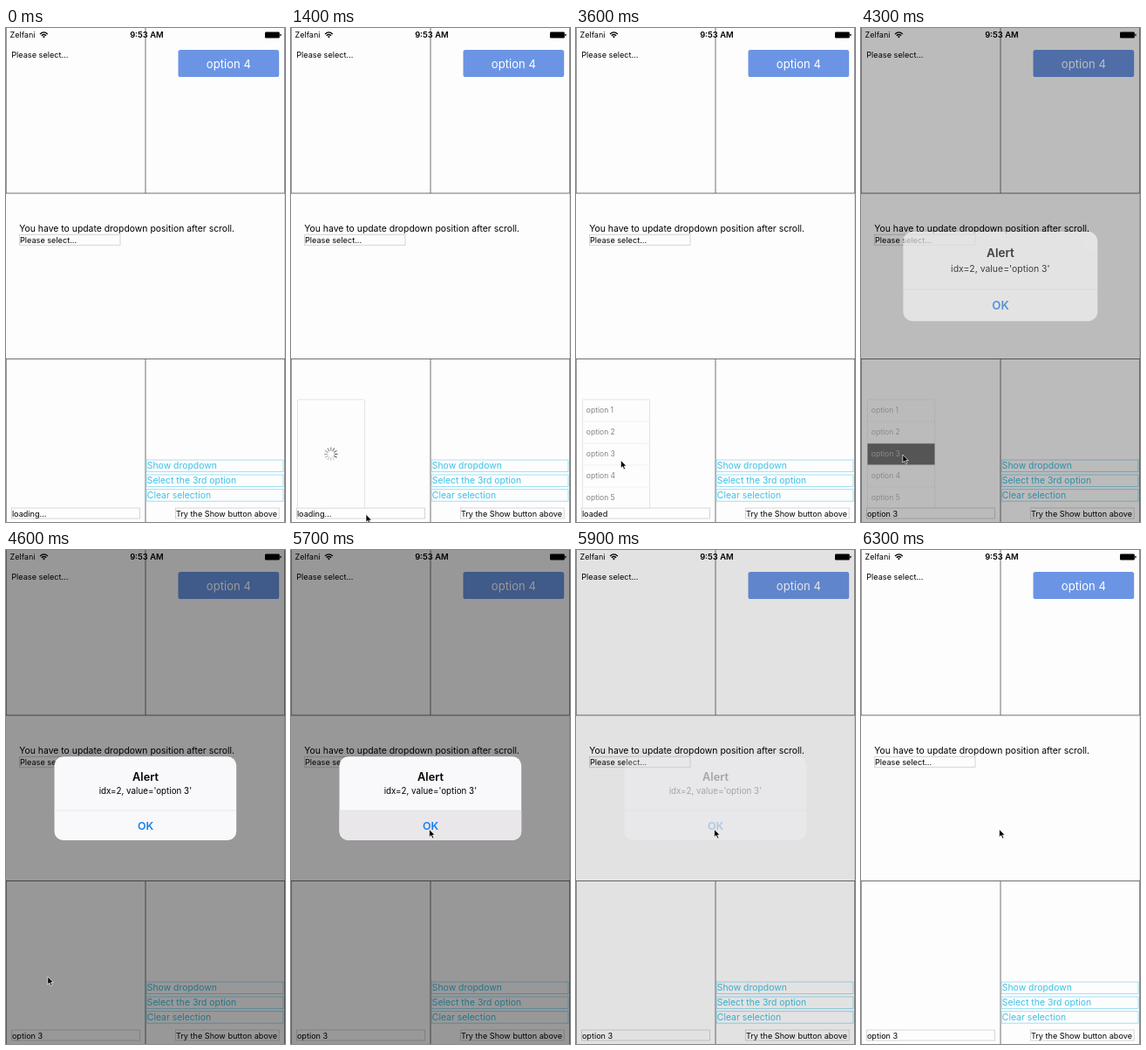
Write an HTML page that moves like this. It is 320 px wide and 565 px high and loops after 6400 ms.

```html
<!DOCTYPE html>
<html lang="en">
<head>
<meta charset="utf-8">
<title>Dropdown demo</title>
<style>
html, body { margin: 0; width: 100%; height: 100%; overflow: hidden; background: #fefdfe; }
svg { display: block; width: 100vw; height: 100vh; font-family: Inter, sans-serif; }
text { white-space: pre; }
.s { font-size: 9.15px; }
.m { font-size: 10.4px; }
.o { font-size: 8.55px; fill: #858388; }
.cy { fill: #3cc2e4; }
.mid { text-anchor: middle; }
.b { font-weight: 600; }
.grid { fill: none; stroke: #59575a; stroke-width: .85; }
.box { fill: none; stroke: #cfcdd0; stroke-width: .85; }
.cbox { fill: none; stroke: #8fdcf0; stroke-width: .85; }
</style>
</head>
<body>
<svg viewBox="0 0 320 565">
  <rect width="320" height="565" fill="#fefdfe"/>
  <path class="grid" d="M0 189H320M0 378.5H320M160 0V189M160 378.5V565M.2 0V189M.2 378.5V565M319.7 0V189M319.7 378.5V565"/>
  <path class="box" d="M319.6 189.5V378"/>

  <text x="4.6" y="11.2" font-size="9">Zelfani</text>
  <g fill="none" stroke="#000" stroke-width="1.3">
    <path d="M39 6.9Q43.4 2.9 47.8 6.9M40.7 8.7Q43.4 6.3 46.1 8.7"/>
  </g>
  <path d="M41.9 9.8Q43.4 8.6 44.9 9.8L43.4 11.4Z"/>
  <text class="mid b" x="161.4" y="11.4" font-size="9.4">9:53 AM</text>
  <rect x="297" y="4.6" width="16.8" height="6.8" rx="1.2"/>
  <rect x="314.3" y="6.7" width="1.2" height="2.6" rx=".5"/>

  <text class="s" x="6.3" y="34">Please select...</text>
  <rect x="197.5" y="25" width="115.7" height="31" rx="2.6" fill="#6b95e4"/>
  <text class="mid" x="255.4" y="45.6" font-size="13.1" fill="#fff">option 4</text>

  <text class="m" x="15.3" y="233">You have to update dropdown position after scroll.</text>
  <rect class="box" x="15.5" y="236.3" width="115.5" height="12"/>
  <text class="s" x="16" y="245.8">Please select...</text>

  <rect class="cbox" x="161.2" y="494" width="156.8" height="13.5"/>
  <rect class="cbox" x="161.2" y="511" width="156.8" height="13.5"/>
  <rect class="cbox" x="161.2" y="527.7" width="156.8" height="13.5"/>
  <text class="m cy" x="161.8" y="504.4">Show dropdown</text>
  <text class="m cy" x="161.8" y="521.2">Select the 3rd option</text>
  <text class="m cy" x="161.8" y="538">Clear selection</text>
  <rect class="box" x="194.4" y="549" width="118.8" height="12"/>
  <text class="s" x="194.9" y="558.5">Try the Show button above</text>

  <rect class="box" x="6.5" y="549" width="147" height="12"/>
  <text class="s" id="label" x="6.9" y="558.5"></text>

  <g id="drop">
    <rect x="7.5" y="425" width="77" height="124" rx="1" fill="#fefdfe" stroke="#e2e0e3" stroke-width=".9"/>
    <g id="spin"></g>
    <g id="list"></g>
  </g>

  <rect id="dim" width="320" height="565"/>
  <g id="alert">
    <rect x="55.5" y="236.3" width="208.7" height="95.6" rx="10" fill="#f9f8fa"/>
    <path id="okBg" d="M55.5 298H264.2V321.9a10 10 0 0 1-10 10H65.5a10 10 0 0 1-10-10Z" fill="#e9e7ea"/>
    <path d="M55.5 298H264.2" stroke="#dbd9dd" stroke-width=".6"/>
    <text class="mid b" x="160" y="263.6" font-size="12.7">Alert</text>
    <text class="mid" x="159.9" y="279" font-size="9.8">idx=2, value='option 3'</text>
    <text class="mid b" x="160" y="319.8" font-size="12.4" fill="#1880ea">OK</text>
  </g>
  <path id="cursor" d="M0 0V9L2.1 7.1L3.6 10.5L5.2 9.8L3.7 6.6H6.5Z" stroke="#fff" stroke-width=".7" stroke-linejoin="round"/>
</svg>
<script>
const LOOP = 6400;
const NS = "http://www.w3.org/2000/svg";
const $ = id => document.getElementById(id);
const label = $("label"), drop = $("drop"), spin = $("spin"), list = $("list");
const dim = $("dim"), alertBox = $("alert"), okBg = $("okBg"), cursor = $("cursor");

function add(parent, tag, attrs, text) {
  const el = document.createElementNS(NS, tag);
  for (const k in attrs) el.setAttribute(k, attrs[k]);
  if (text) el.textContent = text;
  parent.appendChild(el);
  return el;
}

const blades = Array.from({ length: 12 }, (_, i) => add(spin, "path", {
  d: "M0 -4.2V-7.4", stroke: "#666", "stroke-width": 1.2, "stroke-linecap": "round",
  transform: `translate(45.8 487.3) rotate(${i * 30})`
}));

const press = add(list, "rect", { x: 7.5, y: 475, width: 77, height: 24.7, fill: "#000" });
for (let i = 0; i < 5; i++) {
  const y = 425 + i * 25;
  if (i) add(list, "path", { d: `M7.5 ${y}H84.5`, stroke: "#e9e7ea", "stroke-width": .7 });
  add(list, "text", { class: "o", x: 11.8, y: y + 15.4 }, "option " + (i + 1));
}

const ramp = (t, a, b) => Math.min(1, Math.max(0, (t - a) / (b - a)));
const easeOut = x => 1 - (1 - x) * (1 - x);
const easeInOut = x => x * x * (3 - 2 * x);
const show = (el, on) => el.setAttribute("visibility", on ? "inherit" : "hidden");
const fade = (el, v) => el.setAttribute("opacity", v.toFixed(3));

// start, end, x and y to reach, easing
const moves = [
  [100, 500, 86, 556.3, easeOut],
  [3150, 3800, 47.8, 488, easeOut],
  [4600, 5250, 158.6, 319.4, easeInOut]
];

function pointer(t) {
  let x = 98, y = 578;
  for (const [a, b, tx, ty, ease] of moves) {
    const p = ease(ramp(t, a, b));
    x += (tx - x) * p;
    y += (ty - y) * p;
  }
  return `translate(${x.toFixed(2)} ${y.toFixed(2)})`;
}

function draw(t) {
  cursor.setAttribute("transform", pointer(t));

  const loaded = t >= 2750;
  const text = t >= 4150 ? "option 3" : loaded ? "loaded" : "loading...";
  if (label.textContent !== text) label.textContent = text;
  fade(label, 1 - .8 * (ramp(t, 550, 650) - ramp(t, 700, 850)));

  fade(drop, ramp(t, 750, 950) * (1 - ramp(t, 4150, 4480)));
  show(spin, !loaded);
  show(list, loaded);
  show(press, t >= 3980);
  const head = Math.floor(t / 1000 * 12);
  blades.forEach((el, i) => fade(el, 1 - .75 * ((head - i + 1200) % 12) / 11));

  const opening = easeOut(ramp(t, 4130, 4540));
  const p = opening * (1 - easeOut(ramp(t, 5750, 6060)));
  fade(dim, .4 * p);
  fade(alertBox, p);
  const k = 1.2 - .2 * opening;
  alertBox.setAttribute("transform", `translate(160 284.2) scale(${k.toFixed(4)}) translate(-160 -284.2)`);
  show(okBg, t >= 5450 && t < 5850);
}

const start = performance.now();
function tick() {
  draw((performance.now() - start) % LOOP);
  requestAnimationFrame(tick);
}
tick();
</script>
</body>
</html>
```
